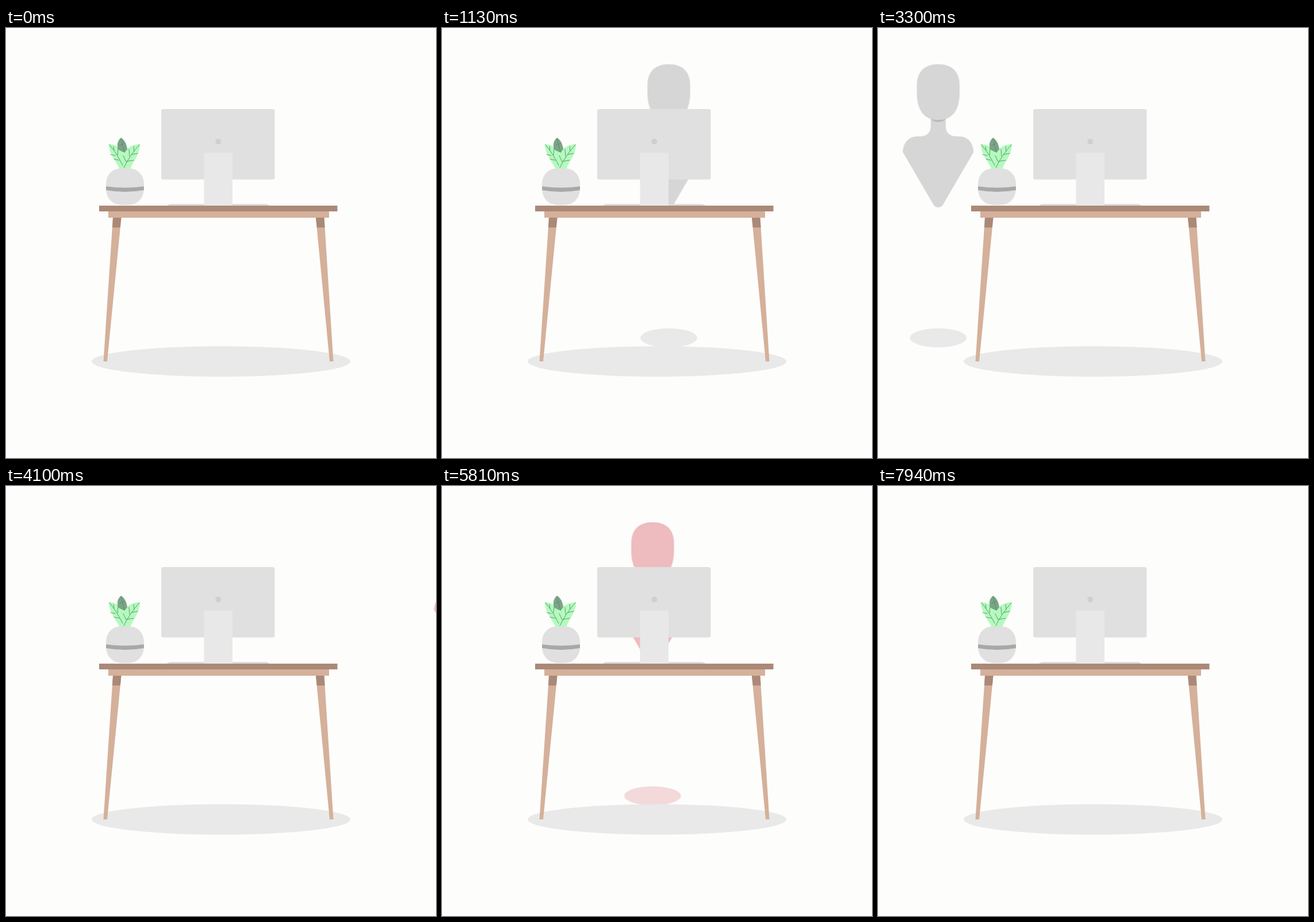
These frames come from a looping animation (748 px wide and 748 px high, 8000 ms). An HTML page:

```html
<!DOCTYPE html>
<html lang="en">
<head>
<meta charset="utf-8">
<title>Desk visitors</title>
<style>
  html, body { margin: 0; width: 100%; height: 100%; overflow: hidden; background: #fdfdfc; }
  svg { display: block; width: 100%; height: 100%; }

  .visitor {
    animation: walk 4s 30ms infinite both, swap 8s 30ms step-end infinite both;
  }
  .body { fill: var(--body); }
  .chin { fill: var(--chin); }
  .cast { fill: var(--cast); }

  /* Glide in, overshoot slightly, settle, pause, glide out. */
  @keyframes walk {
    0% { transform: translateX(810px); animation-timing-function: cubic-bezier(.333, 0, .667, 1); }
    33% { transform: translateX(361.5px); animation-timing-function: cubic-bezier(.333, 0, .667, 1); }
    46% { transform: translateX(366.5px); animation-timing-function: linear; }
    57.5% { transform: translateX(366.5px); animation-timing-function: cubic-bezier(.333, 0, .667, 1); }
    100% { transform: translateX(-65.5px); }
  }
  @keyframes swap {
    0% { --body: #d6d6d6; --chin: #bababa; --cast: #e9e9e9; }
    50%, 100% { --body: #eebbbf; --chin: #e58f9f; --cast: #f3d9da; }
  }

  .wood { fill: #d5b09a; }
  .dark-wood { fill: #aa8978; }
  .screen { fill: #e0e0e0; }
  .stand { fill: #e8e8e8; }
  .leaf { fill: #b2fbbd; }
  .dark-leaf { fill: #7ba586; }
  .veins { fill: none; stroke: #5c8a69; stroke-width: .9; stroke-linecap: round; }
</style>
</head>
<body>
<svg viewBox="0 0 748 748">
  <g class="visitor">
    <ellipse class="cast" cy="539" rx="49.3" ry="16.5"/>
    <path class="body" d="M-13 150V172Q-14 188 -32 188.500H-37C-53 189 -61.500 202 -61.500 216L-8.500 307Q-6 312 0 312Q6 312 8.500 307L61.500 216C61.500 202 53 189 37 188.500H32Q14 188 13 172V150Z"/>
    <path class="chin" d="M-13 157H13V159Q0 168 -13 159Z"/>
    <path class="body" d="M-37.200 100C-37.200 76 -24 63 0 63S37.200 76 37.200 100V113C37 143 25 160 0 160S-37 143 -37.200 113Z"/>
  </g>

  <ellipse cx="374" cy="580" rx="225" ry="26.500" fill="#e9e9e9"/>

  <g class="desk">
    <path class="wood" d="M186 330H200.500L176 580H169.500ZM539 330H553.500L569.500 580H563Z"/>
    <path class="dark-wood" d="M186 330H200.500L198.800 347H184.900ZM539 330H553.500L554.600 347H540.700Z"/>
    <rect class="wood" x="178" y="319" width="384" height="11"/>
    <rect class="dark-wood" x="162" y="309" width="414.500" height="10"/>
  </g>

  <g class="monitor">
    <rect class="screen" x="270" y="141" width="197.500" height="122.500" rx="4"/>
    <circle cx="369.300" cy="197.500" r="5" fill="#cfcfcf"/>
    <path d="M280 309Q282 306 287 306H451Q456 306 458 309Z" fill="#dcdcdc"/>
    <rect class="stand" x="344.500" y="217" width="49.500" height="92"/>
  </g>

  <g class="plant">
    <path class="leaf" d="M178.500 202C192 203 204 209 206 224V246H198C191 231 180 221 178.500 202Z"/>
    <path class="leaf" d="M233 202C216 203 203 212 203 228V246H216C222 229 232 223 233 202Z"/>
    <path class="dark-leaf" d="M200 191C192 197 193 208 196 212L206 217L211 211C210 202 206 194 200 191Z"/>
    <path class="veins" d="M180 203Q192 217 203 239M188 213L187 206M194 221L195 209M190 222L182 220M197 230L188 228M232 203Q215 222 205 243M223 214L222 206M215 223L214 211M219 220L229 218M210 232L222 230M209 233L204 222M200 192L206 216M202 203L198 204M203 202L206 200"/>
    <path class="screen" d="M174 272C174 254 186 244 202 244H212C228 244 240 254 240 272V279C240 297 228 308 212 308H202C186 308 174 297 174 279Z"/>
    <path d="M174 275.500Q207 280 240 275.500V282Q207 288 174 282Z" fill="#a8a8a8"/>
  </g>
</svg>
</body>
</html>
```
